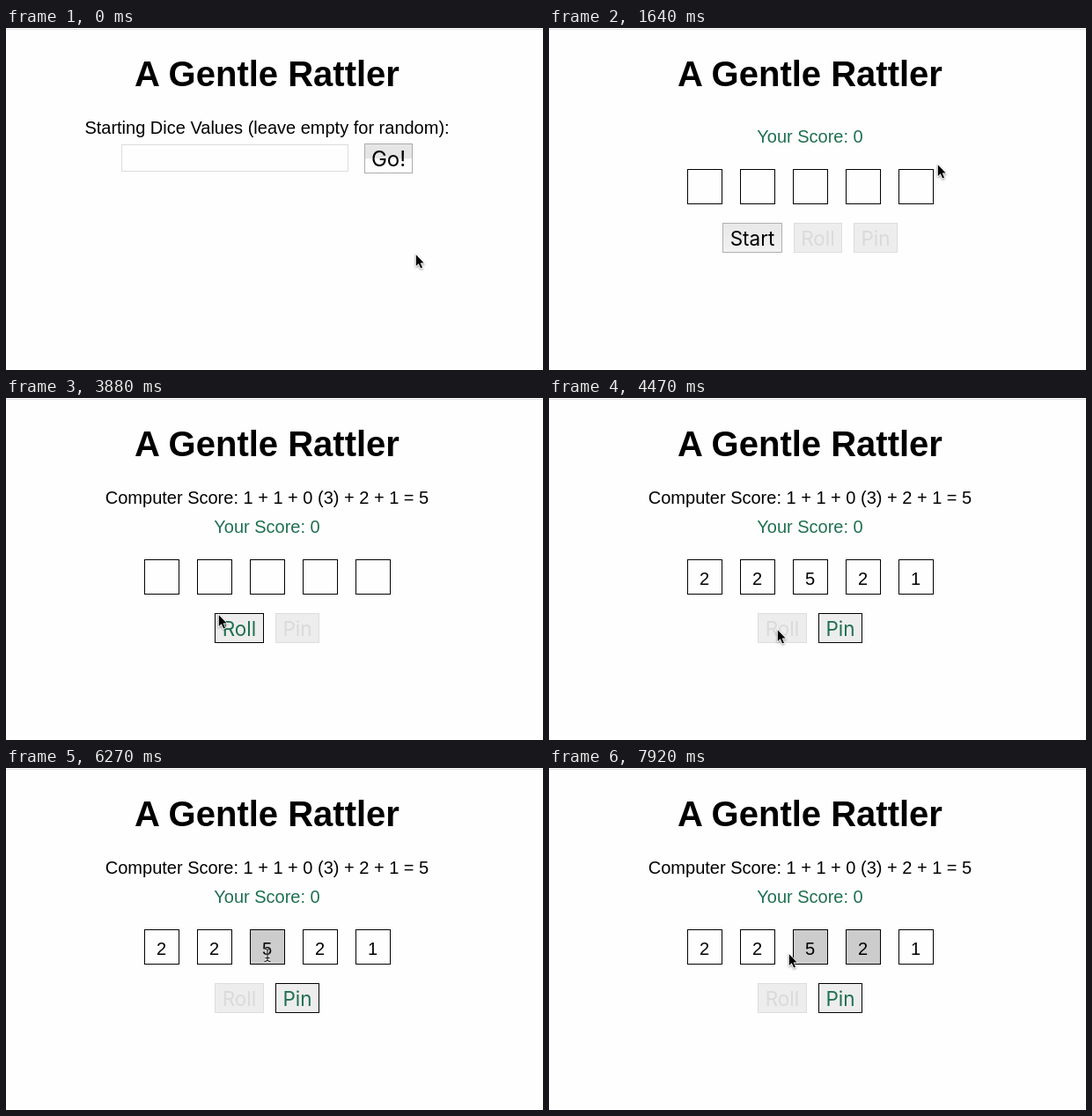
These frames come from a looping animation (610x388 px, 8000 ms). An HTML page:

```html
<!DOCTYPE html>
<html lang="en">
<head>
<meta charset="utf-8">
<title>Dice game</title>
<style>
  html, body { margin: 0; width: 100%; height: 100%; overflow: hidden; background: #fefefe; }
  svg { display: block; width: 610px; height: 388px; }
  text { font: 20px "Liberation Sans", Arial, sans-serif; text-anchor: middle; }
  .title { font-size: 40px; font-weight: bold; }
  .green { fill: #1f7050; }
  .die { fill: #fefefe; stroke: #000; }
  .die.hover { fill: #e6e6e6; }
  .die.picked { fill: #ccc; }
  .button text { font: 22.5px Inter, Roboto, sans-serif; }
  .button rect { fill: #ededed; stroke: #000; }
  .go text { font-size: 24px; }
  .go rect { fill: url(#split); stroke: #ababab; }
  .start rect { fill: url(#soft); stroke: #b0b0b0; }
  .player text { fill: #1f7050; }
  .disabled rect { fill: #ededed; stroke: #ddd; }
  .disabled text { fill: #dadada; }
  .pressed rect { fill: url(#dark); stroke: #a4a4a4; }
  #arrow { stroke: #fff; stroke-width: 1.6px; paint-order: stroke; filter: drop-shadow(0 1px 1px #0006); }
  #beam { fill: none; stroke: #111; filter: drop-shadow(0 0 1px #fff); }
</style>
</head>
<body>
<svg viewBox="0 0 610 388">
  <defs>
    <linearGradient id="split" x2="0" y2="1">
      <stop stop-color="#e6e6e6"/><stop offset=".5" stop-color="#e4e4e4"/>
      <stop offset=".5" stop-color="#fcfcfc"/><stop offset="1" stop-color="#fefefe"/>
    </linearGradient>
    <linearGradient id="soft" x2="0" y2="1">
      <stop stop-color="#e8e8e8"/><stop offset="1" stop-color="#f1f1f1"/>
    </linearGradient>
    <linearGradient id="dark" x2="0" y2="1">
      <stop stop-color="#b2b2b2"/><stop offset="1" stop-color="#c0c0c0"/>
    </linearGradient>
  </defs>
  <path d="M0 1.5H610" stroke="#e2e2e2"/>
  <text class="title" x="296.5" y="66">A Gentle Rattler</text>

  <g id="setup">
    <text x="296.5" y="120">Starting Dice Values (leave empty for random):</text>
    <rect x="131.5" y="132.5" width="257" height="30" fill="#fefefe" stroke="#dcdcdc"/>
  </g>

  <text id="computer" x="296.5" y="120">Computer Score: 1 + 1 + 0 (3) + 2 + 1 = 5</text>
  <g id="board">
    <text class="green" x="296.5" y="130">Your Score: 0</text>
    <g id="dice"></g>
  </g>
  <g id="buttons"></g>

  <g id="cursor">
    <path id="arrow" d="M.8 1.2V14L3.7 11.3 6.1 16.6 8 15.8 5.7 10.6H9.6Z"/>
    <path id="beam" d="M-3.5-7Q0-7 0-5Q0-7 3.5-7M0-5V5.5M-3.5 7.5Q0 7.5 0 5.5Q0 7.5 3.5 7.5M-2.5 3.5H2.5"/>
  </g>
</svg>
<script>
const LOOP = 8000;
const BEAT = 149.2; // the screen refreshes once per beat, in ms
const DIE = 40, DIE_TOP = 160, SHIFT = 23;

const byId = id => document.getElementById(id);
const show = (node, on) => node.style.display = on ? '' : 'none';
const ease = p => p * p * (3 - 2 * p);

function add(parent, tag, attrs, text = '') {
  const node = document.createElementNS('http://www.w3.org/2000/svg', tag);
  for (const key in attrs) node.setAttribute(key, attrs[key]);
  node.textContent = text;
  parent.append(node);
  return node;
}

function addButton(label, kind, x, y, width) {
  const group = add(byId('buttons'), 'g', { class: `button ${kind}` });
  add(group, 'rect', { x: x + .5, y: y + .5, width: width - 1, height: 33 });
  add(group, 'text', { x: x + width / 2, y: y + 26 }, label);
  return group;
}

const dice = [2, 2, 5, 2, 1].map((value, i) => {
  const x = 157 + 1.5 * DIE * i;
  return {
    x,
    pickedAt: Infinity,
    box: add(byId('dice'), 'rect', { class: 'die', x: x + .5, y: DIE_TOP + .5, width: DIE - 1, height: DIE - 1 }),
    digit: add(byId('dice'), 'text', { x: x + 19.5, y: DIE_TOP + 29 }, value)
  };
});
dice[2].pickedAt = 42;
dice[3].pickedAt = 51;

const go = addButton('Go!', 'go', 407, 131, 55);
const start = addButton('Start', 'start', 197, 221, 68);
const idle = [
  addButton('Roll', 'disabled', 278, 221, 55),
  addButton('Pin', 'disabled', 346, 221, 50)
];
const roll = addButton('Roll', 'player', 237, 244, 56);
const pin = addButton('Pin', 'player', 306, 244, 50);

// Each move eases the pointer to a new place between two beats.
const home = { x: 465, y: 256 };
const moves = [
  { from: 1, to: 4, x: 437, y: 167 },
  { from: 6, to: 7, x: 445, y: 160 },
  { from: 9, to: 11, x: 441, y: 154 },
  { from: 15, to: 17, x: 221, y: 214 },
  { from: 18, to: 21, x: 222, y: 228 },
  { from: 24, to: 28, x: 259, y: 262 },
  { from: 35, to: 39, x: 297, y: 212 },
  { from: 44, to: 50, x: 343, y: 214 },
  { from: 51, to: 53, x: 272, y: 210 }
];

function pointerAt(beat) {
  return moves.reduce((at, { from, to, x, y }) => {
    const p = ease(Math.min(1, Math.max(0, (beat - from) / (to - from))));
    return { x: at.x + (x - at.x) * p, y: at.y + (y - at.y) * p };
  }, home);
}

function render(beat) {
  const board = beat >= 9, playing = beat >= 23, rolled = beat >= 30;
  const { x, y } = pointerAt(beat);
  const top = DIE_TOP + (playing ? SHIFT : 0);

  show(byId('setup'), !board);
  show(go, !board);
  show(byId('board'), board);
  byId('board').setAttribute('transform', `translate(0 ${top - DIE_TOP})`);
  show(byId('computer'), playing);
  [start, ...idle].forEach(button => show(button, board && !playing));
  [roll, pin].forEach(button => show(button, playing));

  go.classList.toggle('pressed', beat === 8);
  start.classList.toggle('pressed', beat === 22);
  roll.classList.toggle('pressed', beat === 29);
  roll.classList.toggle('disabled', rolled);
  pin.classList.toggle('disabled', !rolled);

  let overDigit = false;
  for (const die of dice) {
    const dx = Math.abs(x - die.x - DIE / 2), dy = Math.abs(y - top - DIE / 2);
    const picked = beat >= die.pickedAt;
    show(die.digit, rolled);
    die.box.classList.toggle('picked', picked);
    die.box.classList.toggle('hover', rolled && !picked && Math.max(dx, dy) < DIE / 2);
    overDigit ||= rolled && dx < 6 && dy < 12;
  }

  byId('cursor').setAttribute('transform', `translate(${Math.round(x)} ${Math.round(y)})`);
  show(byId('beam'), overDigit);
  show(byId('arrow'), !overDigit);
}

function tick() {
  render(Math.floor((performance.now() % LOOP + 10) / BEAT));
  requestAnimationFrame(tick);
}
tick();
</script>
</body>
</html>
```
